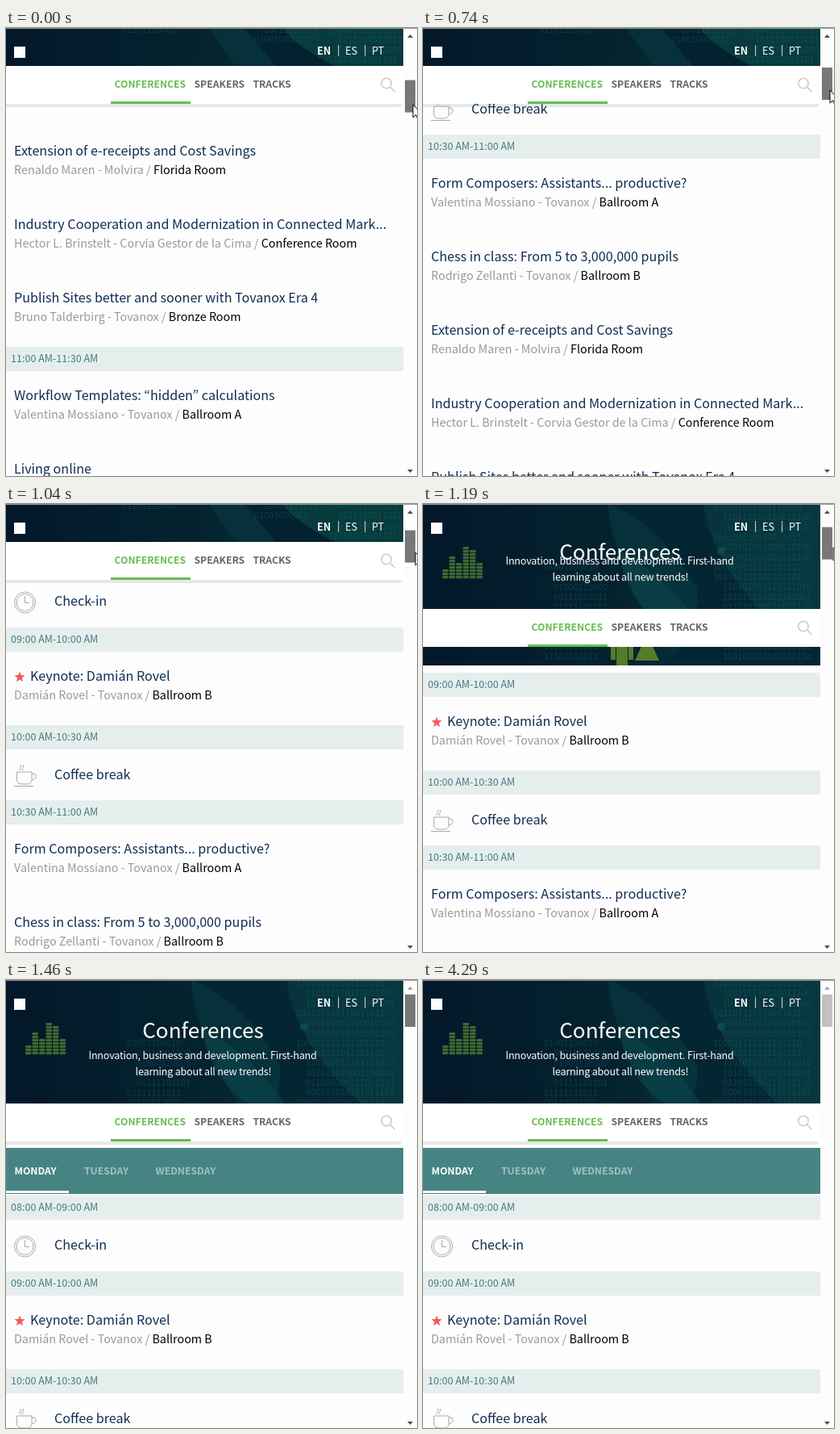
Write an HTML page that moves like this. It is 510 px wide and 555 px high and loops after 6.11 s.

```html
<!DOCTYPE html>
<html lang="en">
<head>
<meta charset="utf-8">
<title>Conference schedule</title>
<style>
html, body { margin: 0; width: 100%; height: 100%; overflow: hidden; background: #fdfdfd; }
#stage {
  --scroll: 665; --nav: 47; --open: 0; --thumb: #787878; --px: 505; --py: 95; --up: #505050;
  display: block; width: 510px; height: 555px;
  font: 14.35px "Noto Sans CJK JP", "Noto Sans CJK SC", "Open Sans", sans-serif;
  font-variant-east-asian: proportional-width;
  animation: drag 6110ms step-end infinite;
}
@keyframes drag {
  0% { --scroll: 665; --nav: 47; --open: 0; --thumb: #787878; --px: 505; --py: 95; --up: #505050; }
  9.656% { --scroll: 610; --px: 505; --py: 89; }
  12.111% { --scroll: 443; --px: 505; --py: 77; }
  14.566% { --scroll: 332; --px: 507; --py: 69; }
  17.021% { --scroll: 208; --px: 508; --py: 60; }
  19.476% { --scroll: 152; --nav: 130; --open: 1; --px: 509; --py: 54; }
  21.44% { --scroll: 55; --nav: 150; --px: 509; --py: 47; }
  23.895% { --scroll: 0; --nav: 153; --px: 530; --py: 47; --up: #a3a3a3; }
  32.569% { --thumb: #a8a8a8; }
  70.212% { --thumb: #c1c1c1; }
}
#list { transform: translateY(calc(var(--scroll) * -1px)); }
#open { opacity: var(--open); }
#heading { transform: translateY(max(var(--nav) * 1px - 153px, -3px)); }
#tagline { transform: translateY(calc(var(--nav) * 1px - 153px)); }
.nav { transform: translateY(calc(var(--nav) * 1px)); }
#thumb { fill: var(--thumb); transform: translateY(calc(var(--scroll) * .07px)); }
#up { fill: var(--up); }
#pointer { transform: translate(calc(var(--px) * 1px), calc(var(--py) * 1px)); }
.title { font-size: 16.14px; fill: #0f2d52; }
.by { fill: #999; }
.room { fill: #000; }
.time { font-size: 12.55px; fill: #3f7b7e; }
.caps { font-size: 12.2px; font-weight: 600; }
.icon { fill: none; stroke: #b3a5a5; }
.hero { font-size: 12.55px; fill: #fff; }
#heading { font-size: 26.1px; font-weight: 300; text-anchor: middle; }
#tagline { letter-spacing: -.2px; text-anchor: middle; }
.bits { font-size: 11px; fill: #1d7478; opacity: .32; }
</style>
</head>
<body>
<svg id="stage" viewBox="0 0 510 555">
  <defs>
    <linearGradient id="night" gradientUnits="userSpaceOnUse" x2="493">
      <stop offset="0" stop-color="#03182a"/>
      <stop offset=".5" stop-color="#04232f"/>
      <stop offset="1" stop-color="#084244"/>
    </linearGradient>
    <clipPath id="low"><path d="M0 0H493V47H0z"/></clipPath>
    <clipPath id="tall"><path d="M0 0H493V200H0z"/></clipPath>
  </defs>

  <path d="M0 0H510V555H0z" fill="#fdfdfd"/>
  <g id="list"></g>

  <path class="nav" d="M0 47H491Q491 51 487 51H0z" fill="#467c7c" opacity=".14"/>

  <g clip-path="url(#low)">
    <path d="M0 0H493V47H0z" fill="url(#night)"/>
    <path d="M252 0H296L335 47H285z" fill="#06303a"/>
    <path d="M296 0H343Q362 24 408 47H335z" fill="#042130"/>
    <path d="M343 0Q362 24 408 47H493V0z" fill="#073b3d"/>
    <g id="lowBits" class="bits"></g>
  </g>

  <g id="open" class="hero">
    <g clip-path="url(#tall)">
      <path d="M0 0H493V200H0z" fill="url(#night)"/>
      <path d="M229 0Q238 92 322 200H493V0z" fill="#07353e" opacity=".75"/>
      <path d="M229 0H348Q358 76 440 153L493 176V200H300Q345 150 340 105Q290 20 229 0z" fill="#042633"/>
      <path d="M242 60Q300 85 345 153H300Q256 125 242 60z" fill="#0a4249" opacity=".7"/>
      <circle cx="370" cy="58" r="5" fill="#0a4b4c"/>
      <g id="tallBits" class="bits"></g>
      <g id="bars" fill="#3f682f"></g>
      <path d="M240 172h14v28h-14zM233 175h6v18h-6zM255 175h6v18h-6zM273 172h10l10 22h-30z" fill="#587a2b"/>
    </g>
    <text id="heading" x="244.5" y="72">Conferences</text>
    <g id="tagline">
      <text x="244" y="98">Innovation, business and development. First-hand</text>
      <text x="245" y="118">learning about all new trends!</text>
    </g>
  </g>

  <path d="M10 23h14v14h-14z" fill="#fff"/>
  <g class="hero">
    <text x="386" y="33" font-weight="700">EN</text>
    <text x="411" y="32">|</text><text x="421" y="33">ES</text>
    <text x="444" y="32">|</text><text x="454" y="33">PT</text>
  </g>

  <g class="nav">
    <path d="M0 0H493V47H0z" fill="#fff"/>
    <path d="M130 44H229V47H130z" fill="#67bd50"/>
    <g class="caps" fill="#666">
      <text x="134.5" y="27" fill="#67bd50">CONFERENCES</text>
      <text x="233.5" y="27">SPEAKERS</text>
      <text x="306.5" y="27">TRACKS</text>
    </g>
    <g fill="none" stroke="#ccc" stroke-width="1.6">
      <circle cx="472" cy="21.5" r="6.2"/><path d="M476.5 26L482.5 32"/>
    </g>
  </g>

  <path d="M493 0H510V555H493z" fill="#fdfdfd"/>
  <path d="M0 0H510V1H0z" fill="#999"/>
  <path id="up" d="M498 12h7l-3.5 -4z"/>
  <path d="M498 547h7l-3.5 4z" fill="#505050"/>
  <path id="thumb" d="M495 18h13v40h-13z"/>
  <path id="pointer" d="M0 0V16L3.5 12.5L6 18L8.5 17L6 11.5H11z" fill="#fff" stroke="#000"/>
</svg>

<script>
const $ = id => document.getElementById(id);
const text = (x, y, cls, body) => `<text x="${x}" y="${y}" class="${cls}">${body}</text>`;
const rect = (x, y, w, h, fill) => `<rect x="${x}" y="${y}" width="${w}" height="${h}" fill="${fill}"/>`;

const slot = (y, hours) => rect(0, y, 493, 30, '#e6eeed') + text(6, y + 19, 'time', hours);
const pause = (y, label, icon) =>
  text(60, y, 'title', label) + `<g class="icon" transform="translate(10 ${y - 18})">${icon}</g>`;
const talk = (y, title, by, room, x = 10) =>
  text(x, y, 'title', title) +
  text(10, y + 23, 'by', `${by} / <tspan class="room">${room}</tspan>`);

const clock = '<circle cx="13.5" cy="14" r="13"/><circle cx="13.5" cy="14" r="10.5"/><path d="M13.5 6v8.5h5.5"/>';
const cup = '<path d="M3.5 9h18.5v9q0 6-6 6h-6.5q-6 0-6-6zM22 11h2q3 0 3 3.5t-5 4.5M0 26.5h24M8 7q-2-2 0-3.5t0-3.5M11 7q-2-2 0-3.5t0-3.5"/>';

function star(cx, cy, r) {
  const points = Array.from({ length: 10 }, (_, i) => {
    const a = i * Math.PI / 5, d = i % 2 ? r * .42 : r;
    return `${cx + d * Math.sin(a)},${cy - d * Math.cos(a)}`;
  });
  return `<polygon points="${points.join(' ')}" fill="#f25c5c"/>`;
}

const days = rect(0, 208, 493, 57, '#468483') + rect(0, 261, 78, 3, '#fff') +
  ['MONDAY', 'TUESDAY', 'WEDNESDAY'].map((day, i) =>
    `<text class="caps" x="${[10.5, 97, 185.5][i]}" y="241" fill="${i ? '#a2c1c1' : '#fff'}">${day}</text>`).join('');

$('list').innerHTML = [
  days,
  slot(267, '08:00 AM-09:00 AM'),
  pause(334, 'Check-in', clock),
  slot(361, '09:00 AM-10:00 AM'),
  star(17, 422.5, 7),
  talk(427, 'Keynote: Damián Rovel', 'Damián Rovel - Tovanox', 'Ballroom B', 30),
  slot(482, '10:00 AM-10:30 AM'),
  pause(549, 'Coffee break', cup),
  slot(575, '10:30 AM-11:00 AM'),
  talk(641, 'Form Composers: Assistants... productive?', 'Valentina Mossiano - Tovanox', 'Ballroom A'),
  talk(732, 'Chess in class: From 5 to 3,000,000 pupils', 'Rodrigo Zellanti - Tovanox', 'Ballroom B'),
  talk(823, 'Extension of e-receipts and Cost Savings', 'Renaldo Maren - Molvira', 'Florida Room'),
  talk(914, 'Industry Cooperation and Modernization in Connected Mark...',
    'Hector L. Brinstelt - Corvia Gestor de la Cima', 'Conference Room'),
  talk(1005, 'Publish Sites better and sooner with Tovanox Era 4', 'Bruno Talderbirg - Tovanox', 'Bronze Room'),
  slot(1060, '11:00 AM-11:30 AM'),
  talk(1126, 'Workflow Templates: “hidden” calculations', 'Valentina Mossiano - Tovanox', 'Ballroom A'),
  talk(1217, 'Living online', 'Rodrigo Zellanti - Tovanox', 'Ballroom B'),
].join('');

// Faint binary digits behind the heading
let seed = 7;
const bit = () => (seed = seed * 16807 % 2147483647) >> 8 & 1;
const bits = n => Array.from({ length: n }, bit).join('');
function bitRows(x, length, top, bottom) {
  let rows = '';
  for (let y = top; y < bottom; y += 12.3) rows += text(x + bit() * 12, y, '', bits(length));
  return rows;
}
$('lowBits').innerHTML = bitRows(132, 11, 6, 10) + bitRows(308, 11, 6, 30) + bitRows(400, 14, 6, 50);
$('tallBits').innerHTML = bitRows(150, 11, 82, 200) + bitRows(360, 18, 8, 200);

// Stacks of coins
$('bars').innerHTML = [12, 26, 19, 39, 33, 20].map((h, i) => {
  let coins = '';
  for (let y = 0; y < h; y += 4) coins += `<rect x="${24 + i * 8.5}" y="${89 - y}" width="7.5" height="3.3" rx="1"/>`;
  return coins;
}).join('');
</script>
</body>
</html>
```
